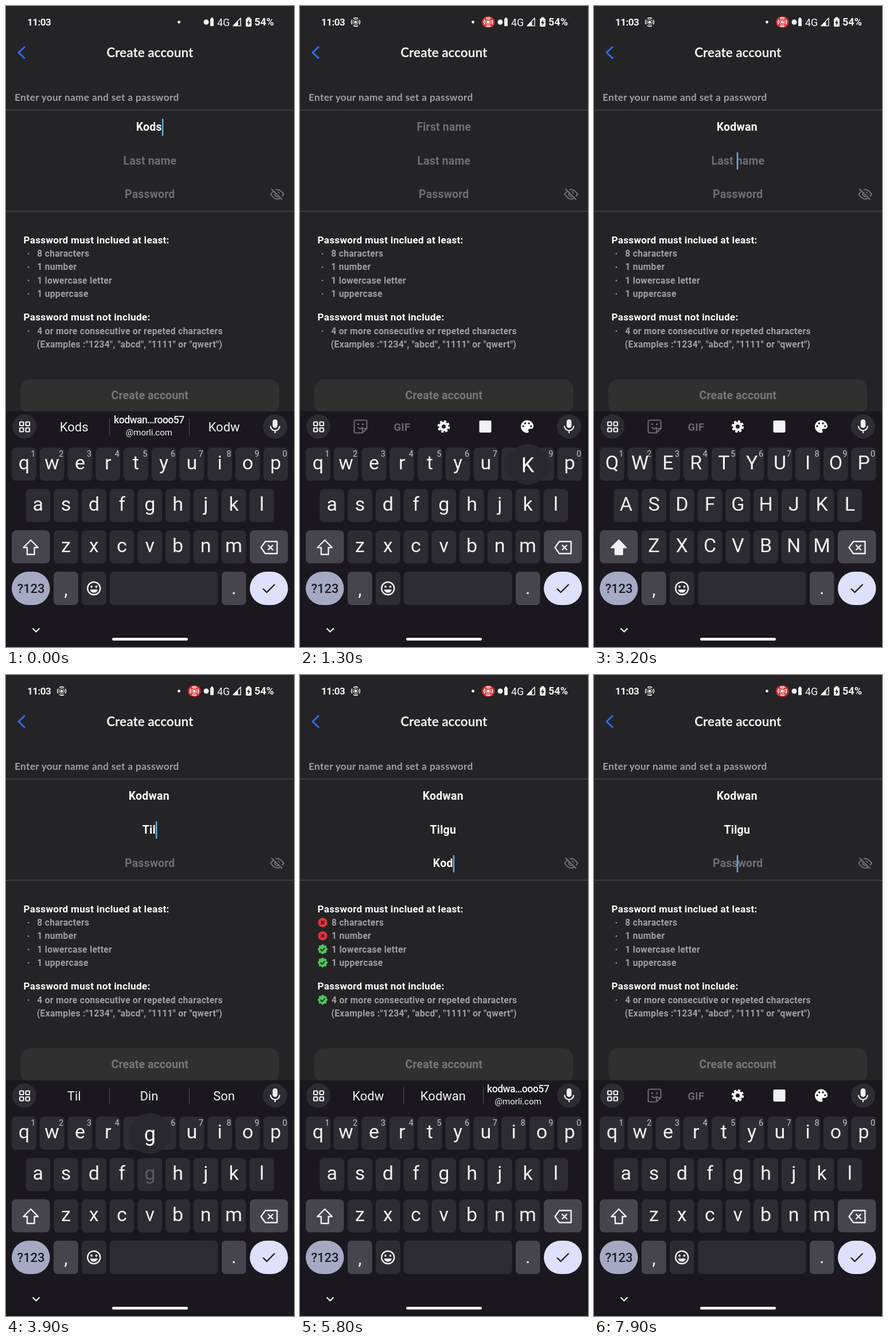
Recreate the animation shown at these times as an HTML page. Size 502 by 1115 pixels, loop 8 s.

```html
<!DOCTYPE html>
<html lang="en">
<head>
<meta charset="utf-8">
<title>Create account</title>
<style>
  html, body { margin: 0; width: 100%; height: 100%; overflow: hidden; background: #242325; }
  svg { display: block; width: 100vw; height: 100vh; }
</style>
</head>
<body>
<svg id="stage" viewBox="0 0 502 1115"></svg>
<script>
const LOOP = 8000;
const BG = '#242325', KEY = '#2d2c32', KEY2 = '#46444c', LIT = '#a5a9c3', WHITE = '#f2f1f5', GREY = '#a09fa2', DIM = '#6f6e71';
const ROBOTO = 'Roboto, sans-serif', LATO = 'Lato, sans-serif';
const stage = document.getElementById('stage');
const pen = document.createElement('canvas').getContext('2d');

// ---- timeline: [start ms, ...] ----
const edits = [
  [0, 0, 'Kods'], [200, 0, 'Kod'], [300, 0, 'Ko'], [400, 0, 'K'], [500, 0, ''],
  [1400, 0, 'K'], [1500, 0, 'Ko'], [1600, 0, 'Kod'], [1700, 0, 'Kodwa'], [1800, 0, 'Kodwan'],
  [3100, 1, ''], [3600, 1, 'T'], [3700, 1, 'Ti'], [3800, 1, 'Til'], [4000, 1, 'Tilg'], [4100, 1, 'Tilgu'],
  [5000, 2, ''], [5400, 2, 'K'], [5500, 2, 'Ko'], [5700, 2, 'Kod'], [5900, 2, 'Kodw'], [6000, 2, 'Kodwa'], [6100, 2, 'Kodwan'],
  [6800, 2, 'Kodwa'], [6900, 2, 'Kodw'], [7000, 2, 'Kod'], [7300, 2, 'Ko'], [7500, 2, 'K'], [7600, 2, '']
];
const mailA = 'kodwan…rooo57 @morli.com', mailB = 'kodwa…ooo57 @morli.com';
const hints = [
  [0, 'Kods', mailA, 'Kodw'], [300, 'Kod', mailA, 'Kodvi'], [500],
  [1500, 'Ko', 'Kod', 'Kodvi'], [1700, 'Kod', mailA, 'Kodvi'],
  [1900, 'Kodwan', mailA, mailB.slice(0, -1)], [3100],
  [3700, 'Til', 'Din', 'Son'], [4000, 'Tilg', 'Til', 'Tilgu'], [4200, 'Tilgu', 'Tilga', 'Tilgus'], [5000],
  [5500, 'Kod', mailA, 'Kodvi'], [5800, 'Kodw', 'Kodwan', mailB], [6100, 'Kodwan', mailA, mailB],
  [7000, 'Kod', mailA, 'Kodvi'], [7500]
];
const presses = [
  [1200, 'k', 200], [1400, 'o'], [1500, 'd'], [1600, 'w'], [1700, 'n'],
  [3500, 't'], [3600, 'i'], [3700, 'l'], [3900, 'g'], [4000, 'u'],
  [5300, 'k'], [5400, 'o'], [5600, 'd'], [5700, 'w'], [5900, 'a'], [6000, 'n']
];
const capsSpans = [[500, 1300], [3100, 3600], [5200, 5400]];
const eraseSpans = [[100, 600], [6700, 7700]];

const within = (spans, t) => spans.some(([a, b]) => t >= a && t < b);
const latest = (list, t) => list.filter(e => e[0] <= t).pop();

// ---- drawing helpers ----
const text = (x, y, s, size, fill, o = {}) =>
  `<text x="${x}" y="${y}" font-family="${o.font || ROBOTO}" font-size="${size}" font-weight="${o.w || 700}" ` +
  `text-anchor="${o.a || 'middle'}" letter-spacing="${o.ls || 0}" fill="${fill}">${s}</text>`;
const rect = (x, y, w, h, r, fill) => `<rect x="${x}" y="${y}" width="${w}" height="${h}" rx="${r}" fill="${fill}"/>`;
const circle = (x, y, r, fill, extra = '') => `<circle cx="${x}" cy="${y}" r="${r}" fill="${fill}" ${extra}/>`;
const ring = (x, y, r, color, w, extra = '') => circle(x, y, r, 'none', `stroke="${color}" stroke-width="${w}" ${extra}`);
const line = (d, color, w, fill = 'none') =>
  `<path d="${d}" fill="${fill}" stroke="${color}" stroke-width="${w}" stroke-linejoin="round"/>`;

const target = (x, y, color) => circle(x, y, 2.6, color) + ring(x, y, 4.6, color, 1) +
  ring(x, y, 7.4, color, 1.6, 'stroke-dasharray="8.6 3.02" stroke-dashoffset="4.3"');

function badge(y, ok) {
  if (!ok) return circle(39.5, y, 8, '#e5343d') + line(`M36.5 ${y - 3}l6 6m0 -6l-6 6`, BG, 1.8);
  const green = '#4fc25a';
  return circle(39.5, y, 7.4, green) +
    ring(39.5, y, 6.6, green, 4.2, 'stroke-linecap="round" stroke-dasharray="0 5.18"') +
    line(`M35.5 ${y}l3 3l5 -5.5`, BG, 1.8);
}

function statusBar(recording) {
  let s = text(37, 34, '11:03', 17, WHITE, { a: 'start', ls: -.5 }) + circle(301.5, 28, 2.4, WHITE);
  if (recording) s += target(97, 28, WHITE) + rect(317, 18, 22.5, 20, 10, '#dc2f35') + target(328.2, 28, '#fff');
  return s + circle(349, 28, 4.5, WHITE) +
    rect(356, 22, 6, 13, 1, WHITE) + rect(357.5, 20, 3, 3, 0, WHITE) +
    text(368, 34.5, '4G', 18, WHITE, { a: 'start', w: 400 }) +
    line('M396 34.5H409V21Z', WHITE, 1.5) + line('M396 34.5H404V26.2Z', WHITE, 1, WHITE) +
    rect(418, 21.5, 10, 14.5, 2, WHITE) + rect(420.5, 19.5, 5, 3, 0, WHITE) +
    `<path d="M424 23.5l-4 6h2.5l-.8 5l4.3 -6.5h-2.6z" fill="${BG}"/>` +
    text(433, 34.2, '54%', 18, WHITE, { a: 'start' });
}

function cursorAlpha(age) {
  if (age < 500) return 1;
  const p = (age - 500) % 800;
  return p < 200 ? 1 - p / 200 : p < 400 ? 0 : p < 600 ? (p - 400) / 200 : 1;
}

function form(t) {
  const [edited, focus] = latest(edits, t);
  const values = [0, 1, 2].map(f => (latest(edits.filter(e => e[1] === f), t) || [])[2] || '');
  let s = line('M33 70.5L22 81L33 91.5', '#2f6df0', 3) +
    text(250.8, 88.5, 'Create account', 22.5, WHITE, { font: LATO }) +
    text(15, 165, 'Enter your name and set a password', 17.2, GREY, { font: LATO, a: 'start', ls: .35 }) +
    line('M0 181H502M0 357H502', '#58575a', 1.2);

  ['First name', 'Last name', 'Password'].forEach((label, i) => {
    const y = 217 + 58.6 * i, v = values[i];
    s += v ? text(249.3, y, v, 19.4, '#fff', { ls: .3 }) : text(250.8, y, label, 19.4, DIM, { ls: .2 });
    if (i === focus) {
      pen.font = '700 19.4px ' + ROBOTO;
      const x = v ? 250.5 + (pen.measureText(v).width + .3 * v.length) / 2 : 250;
      const alpha = cursorAlpha(t - edited).toFixed(2);
      s += `<g opacity="${alpha}">${rect(x - 1.2, y - 21, 2.5, 30, 0, '#5eaee6')}</g>`;
    }
  });
  s += line('M461.5 327.5Q472.5 311 484 327.5Q472.5 344 461.5 327.5Z', DIM, 2.2) + ring(472.7, 327.5, 4, DIM, 2.2) +
    line('M465 317L484 336', BG, 3) + line('M462.5 318L481.5 337', DIM, 2.2);

  const pw = values[2], x = pw ? 55 : 54.3;
  const rules = [
    [430.5, '8 characters', pw.length >= 8], [453.7, '1 number', /\d/.test(pw)],
    [477, '1 lowercase letter', /[a-z]/.test(pw)], [500.2, '1 uppercase', /[A-Z]/.test(pw)],
    [565, '4 or more consecutive or repeted characters', true]
  ];
  s += text(30.5, 412.5, 'Password must inclued at least:', 17.1, '#fff', { a: 'start', ls: .3 }) +
    text(30.5, 547, 'Password must not include:', 17.1, '#fff', { a: 'start', ls: .3 });
  for (const [y, label, ok] of rules)
    s += (pw ? badge(y, ok) : circle(39, y + .5, 1.3, GREY)) + text(x, y + 5.5, label, 15.6, GREY, { a: 'start', ls: .3 });
  return s + text(x - .5, 593.7, '(Examples :"1234", "abcd", "1111" or "qwert")', 15.6, GREY, { a: 'start', ls: .3 }) +
    rect(25, 649, 451.5, 60, 18, '#313030') + text(250.8, 684, 'Create account', 19.5, '#777678', { ls: .1 });
}

function toolbar(t) {
  let s = circle(32, 731.5, 21, KEY) + circle(469, 731.5, 21, KEY);
  for (const x of [24, 34.5]) for (const y of [723.5, 734])
    s += `<rect x="${x}" y="${y}" width="6.5" height="6.5" rx="1.2" fill="none" stroke="${WHITE}" stroke-width="2.2"/>`;
  s += rect(464.7, 719, 8.6, 15, 4.3, WHITE) + line('M461 730.5A8 8 0 0 0 477 730.5M469 738.5V743', WHITE, 2.2);

  const words = latest(hints, t).slice(1);
  if (words.length) {
    s += line('M180.5 717V747M319.5 717V747', '#4c4b51', 1.2);
    words.forEach((w, i) => {
      const cx = 118.7 + 130.7 * i, [top, mail] = w.split(' ');
      s += mail
        ? text(cx, 725.5, top, 17.5, WHITE, { w: 500, ls: -.5 }) + text(cx, 747, mail, 15, WHITE, { w: 400 })
        : text(cx, 739.5, w, 22, WHITE, { w: 400 });
    });
    return s;
  }
  const off = '#68676c';
  return s + line('M97 720.5H114Q116.5 720.5 116.5 723V735L109 742.5H97Q94.5 742.5 94.5 740V723Q94.5 720.5 97 720.5ZM109 742V735H116', off, 2.2) +
    circle(101.5, 727.5, 1.7, off) + circle(109.5, 727.5, 1.7, off) + line('M100.5 732.5Q105 738 109.5 732.5', off, 2) +
    text(178, 738.5, 'GIF', 18.5, off, { ls: .3 }) +
    ring(250.5, 731.5, 5.8, '#fff', 4.6) + ring(250.5, 731.5, 9, '#fff', 3.4, 'stroke-dasharray="4.2 2.87"') +
    rect(312.5, 721, 21, 21, 2, WHITE) +
    '<path d="M396 720.5A11 11 0 1 0 396 742.5C399 742.5 399 740 398 738.5S398 735.5 400.5 735.5H403Q407 735 407 730.5A11 10.5 0 0 0 396 720.5Z" fill="#fff"/>' +
    [[389, 731], [392.5, 726], [399, 726], [402.8, 731]].map(([a, b]) => circle(a, b, 1.7, '#1b191f')).join('');
}

function keyboard(t) {
  const caps = within(capsSpans, t), erase = within(eraseSpans, t);
  const press = presses.find(([a, , d = 100]) => t >= a && t < a + d);
  const glyph = c => caps ? c.toUpperCase() : c;
  let s = rect(0, 705, 502, 410, 0, '#1a181e') + toolbar(t), popup = '';

  ['qwertyuiop', 'asdfghjkl', 'zxcvbnm'].forEach((row, r) => {
    const cy = 797 + 72 * r, x0 = [31.4, 55.8, 104.5][r];
    [...row].forEach((c, i) => {
      const cx = x0 + 48.75 * i, held = press && press[1] === c;
      const dim = held && t - press[0] < 100;
      s += rect(cx - 21.4, cy - 28.7, 42.8, 57.4, 7, KEY) +
        text(cx, cy + 9.3, glyph(c), 34, dim ? '#5c5b61' : WHITE, { w: 400 });
      if (r === 0) s += text(cx + 16, cy - 13, (i + 1) % 10, 14.5, '#c6c5cb', { w: 400 });
      if (held) popup = circle(cx, cy - 71.5, 35.5, '#29282e') +
        text(cx, cy - 58.5, press[0] === 1200 ? 'K' : glyph(c), 36, '#fff', { w: 400 });
    });
  });

  s += rect(10, 912, 66.5, 57.5, 8, KEY2) +
    line('M43.2 929L56 942H49.5V954H36.9V942H30.4Z', WHITE, 2.4, caps ? WHITE : 'none') +
    rect(425, 912, 66.5, 57.5, 8, erase ? LIT : KEY2) +
    line('M444.5 942L452 931.5H472.5V952.5H452ZM456.5 937.5L465.5 946.5M465.5 937.5L456.5 946.5', WHITE, 2.4);

  s += rect(10, 984, 66.5, 58, 29, LIT) + text(43.5, 1020.5, '?123', 22, '#1d1d28', { w: 500 }) +
    rect(83, 984, 42.8, 58, 7, KEY2) + text(104.5, 1025, ',', 32, WHITE, { w: 400 }) +
    rect(132, 984, 42.8, 58, 7, KEY) + ring(153.2, 1013, 11, WHITE, 2.4) +
    circle(149, 1010, 1.9, WHITE) + circle(157.4, 1010, 1.9, WHITE) +
    `<path d="M146.7 1015H159.7A6.5 5.5 0 0 1 146.7 1015Z" fill="${WHITE}"/>` +
    rect(181, 984, 188.5, 58, 7, KEY) +
    rect(376, 984, 42.5, 58, 7, KEY2) + text(397.2, 1023, '.', 32, WHITE, { w: 400 }) +
    rect(425, 984, 66.5, 58, 29, '#dfe1fc') + line('M448 1013.5L454.5 1020L468.5 1006', '#23232e', 2.4);

  return s + popup + line('M46.5 1082.5L52.5 1088.5L58.5 1082.5', WHITE, 2.2) + rect(185, 1099, 132, 4.8, 2.4, '#fff');
}

let shown = '';
function draw(now) {
  const t = now % LOOP;
  const picture = rect(0, 0, 502, 1115, 0, BG) + statusBar(t >= 100) + form(t) + keyboard(t);
  if (picture !== shown) stage.innerHTML = shown = picture;
  requestAnimationFrame(draw);
}
draw(0);
</script>
</body>
</html>
```
